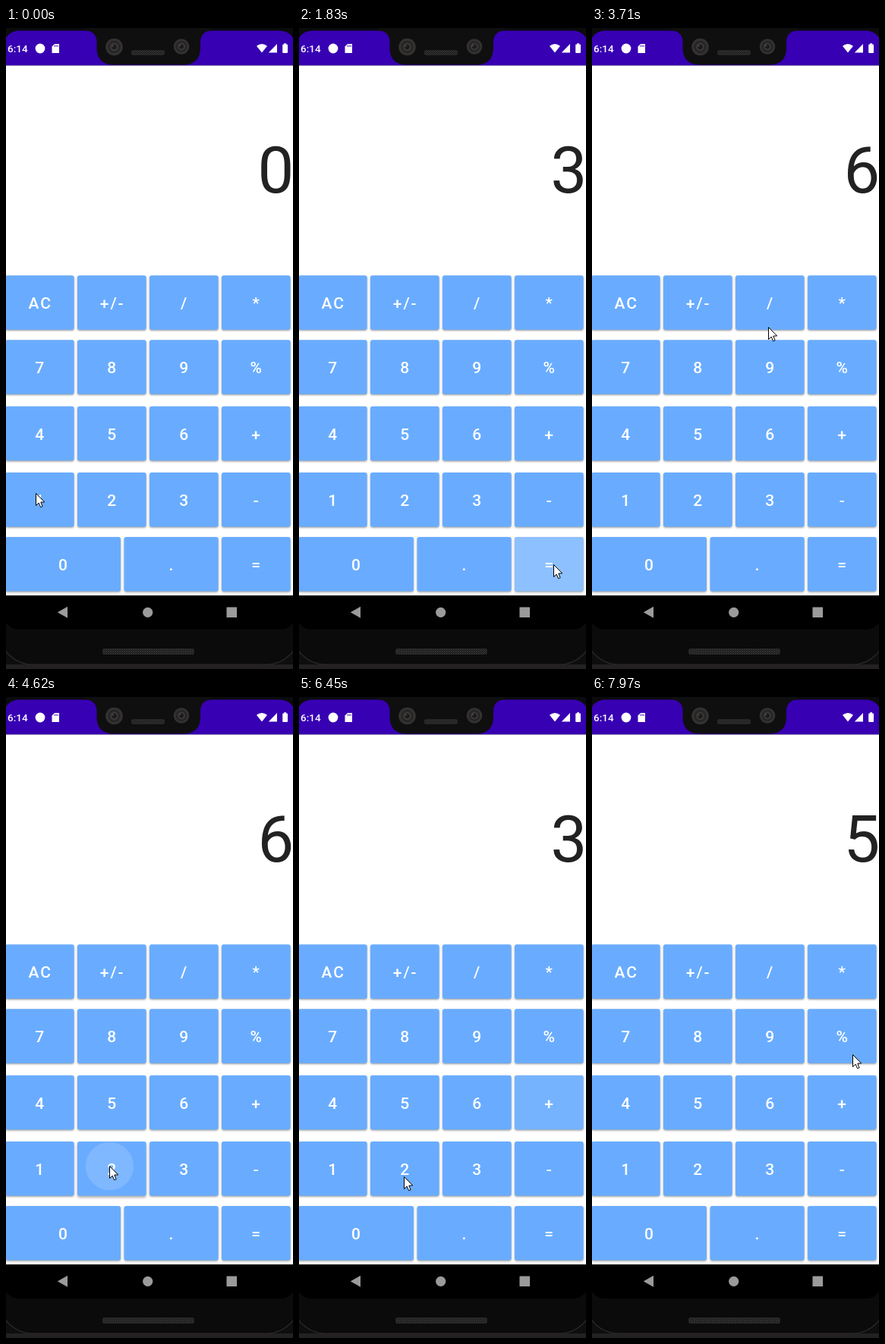
Animation, 378 px wide and 845 px high, one loop 7990 ms. Source, as an HTML page with a canvas:

```html
<!DOCTYPE html>
<html lang="en">
<head>
<meta charset="utf-8">
<title>Calculator</title>
<style>
html, body { margin: 0; width: 100%; height: 100%; overflow: hidden; background: #0e0e0e; }
canvas { display: block; width: 378px; height: 845px; }
</style>
</head>
<body>
<canvas id="stage" width="378" height="845"></canvas>
<script>
const ctx = document.getElementById('stage').getContext('2d');
const LOOP = 7990;
const LAG = 45, ENTER = 225, FADE = 150, LIFT = 100, HOLD = 105;

const clamp = v => Math.max(0, Math.min(1, v));
const mix = (a, b, p) => a + (b - a) * p;
const smooth = p => p * p * (3 - 2 * p);

// cubic-bezier(.4, 0, .2, 1)
function fastOut(x) {
  let lo = 0, hi = 1;
  for (let i = 0; i < 18; i++) {
    const s = (lo + hi) / 2, r = 1 - s;
    if (1.2 * r * r * s + 0.6 * r * s * s + s * s * s < x) lo = s; else hi = s;
  }
  return 3 * (1 - lo) * lo * lo + lo * lo * lo;
}

const buttons = [];
const rows = [['AC', '+/-', '/', '*'], ['7', '8', '9', '%'], ['4', '5', '6', '+'], ['1', '2', '3', '-']];
const tops = [326.3, 411.3, 498.8, 586, 671];
rows.forEach((row, r) => row.forEach((label, c) =>
  buttons.push({ label, x: c * 95 - 1, y: tops[r], w: 90.6, h: 71.5 })));
buttons.push(
  { label: '0', x: -1, y: tops[4], w: 152, h: 71.5 },
  { label: '.', x: 155.6, y: tops[4], w: 124, h: 71.5 },
  { label: '=', x: 284, y: tops[4], w: 90.6, h: 71.5 });

// label, touch time, optional start of the fade
const taps = [
  ['1', 135], ['+', 705], ['2', 1165], ['=', 1590, 1940], ['+', 2330], ['3', 2745, 2975], ['=', 3015],
  ['/', 4025], ['2', 4575], ['=', 4915], ['+', 6125], ['2', 6500], ['=', 6795]
];

const readout = [
  [0, '0'], [240, '1'], [1270, '2'], [1700, '3'], [3120, '6'],
  [4680, '2'], [5020, '3'], [6605, '2'], [6900, '5']
];

// time, x, y of the pointer tip
const path = [
  [270, 39, 613], [680, 334, 541], [745, 334, 545], [1120, 140, 622], [1300, 140, 622],
  [1590, 335, 707], [1940, 335, 707], [2280, 328, 545], [2470, 328, 545], [2730, 238, 645],
  [2840, 238, 645], [3028, 324, 681], [3220, 324, 681], [3400, 342, 681], [3790, 219, 360],
  [4170, 219, 360], [4470, 136, 618], [4690, 136, 618], [4950, 326, 675], [5459, 326, 675],
  [5460, 327, 675], [5600, 327, 675], [6080, 332, 548], [6230, 332, 548], [6450, 138, 632],
  [6640, 138, 632], [6830, 342, 716], [7460, 342, 716], [7970, 343, 471]
];

function pointerAt(t) {
  const i = path.findIndex(k => k[0] > t);
  if (i < 1) return (i ? path[path.length - 1] : path[0]).slice(1);
  const a = path[i - 1], b = path[i];
  const p = smooth((t - a[0]) / (b[0] - a[0]));
  return [mix(a[1], b[1], p), mix(a[2], b[2], p)];
}

function box(x, y, w, h, r, fill) {
  ctx.beginPath();
  ctx.roundRect(x, y, w, h, r);
  if (fill) { ctx.fillStyle = fill; ctx.fill(); }
}

function disc(x, y, r, fill) {
  ctx.beginPath();
  ctx.arc(x, y, r, 0, Math.PI * 2);
  ctx.fillStyle = fill;
  ctx.fill();
}

function poly(points, fill) {
  ctx.beginPath();
  points.forEach(([x, y]) => ctx.lineTo(x, y));
  ctx.closePath();
  ctx.fillStyle = fill;
  ctx.fill();
}

function mesh(x, y, w, h) {
  ctx.save();
  box(x, y, w, h, 3, '#1d1d1d');
  ctx.clip();
  ctx.strokeStyle = '#343434';
  ctx.lineWidth = 0.8;
  ctx.beginPath();
  for (let i = x - h; i < x + w + h; i += 3) {
    ctx.moveTo(i, y); ctx.lineTo(i + h, y + h);
    ctx.moveTo(i + h, y); ctx.lineTo(i, y + h);
  }
  ctx.stroke();
  ctx.restore();
}

function lens(x, y, r) {
  disc(x, y, r, '#343231');
  disc(x, y, r * 0.72, '#262525');
  disc(x, y, r * 0.48, '#3b3938');
  disc(x, y, r * 0.28, '#1c1b1b');
  disc(x - 2, y - 1.5, 1.1, '#55514e');
}

function drawBezel() {
  ctx.fillStyle = '#0e0e0e';
  ctx.fillRect(0, 0, 378, 845);
  ctx.fillStyle = '#242122';
  ctx.fillRect(0, 839, 378, 6);
  box(-9, -20, 396, 859, 44, '#0b0b0b');
  ctx.strokeStyle = '#2c2a2b';
  ctx.lineWidth = 1.2;
  ctx.stroke();
  mesh(127, 818, 121, 8);
}

function drawStatus() {
  ctx.fillStyle = '#0f0f0f';
  ctx.beginPath();
  ctx.moveTo(104, 0);
  ctx.lineTo(104, 3.5);
  ctx.quadraticCurveTo(119, 4, 119.5, 18);
  ctx.lineTo(119.5, 27);
  ctx.quadraticCurveTo(120, 48.5, 142, 48.5);
  ctx.lineTo(233, 48.5);
  ctx.quadraticCurveTo(255.5, 48.5, 256, 27);
  ctx.lineTo(256, 18);
  ctx.quadraticCurveTo(256.5, 4, 271, 3.5);
  ctx.lineTo(271, 0);
  ctx.fill();
  lens(142.5, 25, 11.3);
  lens(231, 24.5, 10.3);
  mesh(165, 29, 44, 7);

  ctx.font = '500 13.5px Roboto, sans-serif';
  ctx.textAlign = 'left';
  ctx.fillStyle = '#fff';
  ctx.fillText('6:14', 2, 32);
  disc(45, 27, 6.4, '#fff');
  poly([[64, 21], [70, 21], [70, 33], [60.5, 33], [60.5, 24.5]], '#fff');
  ctx.fillStyle = '#3700b3';
  [63.7, 65.7, 67.7].forEach(x => ctx.fillRect(x, 22.5, 0.9, 2.4));

  ctx.fillStyle = '#fff';
  ctx.beginPath();
  ctx.moveTo(337, 32.5);
  ctx.lineTo(330, 23.8);
  ctx.quadraticCurveTo(337, 18.2, 344, 23.8);
  ctx.fill();
  poly([[357, 21], [357, 32.5], [345.8, 32.5]], '#fff');
  box(364.2, 21.5, 6.8, 11.5, 1, '#fff');
  ctx.fillRect(366.2, 20.2, 2.8, 2);
}

function drawScreen() {
  ctx.save();
  box(-3, 3.5, 384, 789.5, 20);
  ctx.clip();
  ctx.fillStyle = '#3700b3';
  ctx.fillRect(0, 0, 378, 49.5);
  ctx.fillStyle = '#fff';
  ctx.fillRect(0, 49.5, 378, 698.5);
  ctx.fillStyle = '#000';
  ctx.fillRect(0, 748, 378, 46);
  ctx.restore();
  poly([[67.8, 770.3], [81, 762.8], [81, 777.8]], '#9b9b9b');
  disc(186.7, 770.3, 6.6, '#9b9b9b');
  box(290.5, 763.5, 13.6, 13.6, 0.6, '#9b9b9b');
}

function drawRipple(b, press, fade, t) {
  const age = t - press;
  const alpha = 0.24 * clamp(age / 75) * (1 - clamp((t - fade) / FADE));
  const p = fastOut(clamp(age / ENTER));
  const [sx, sy] = pointerAt(press + LAG);
  const r = mix(Math.max(b.w, b.h) * 0.3, Math.hypot(b.w, b.h) / 2 + 0.5, p);
  ctx.save();
  box(b.x, b.y, b.w, b.h, 2.7);
  ctx.clip();
  disc(mix(sx, b.x + b.w / 2, p), mix(sy, b.y + b.h / 2, p), r, `rgba(255,255,255,${alpha})`);
  ctx.restore();
}

function drawButton(b, t) {
  const live = taps.filter(([label, press, fade = press + ENTER]) =>
    label === b.label && t >= press + LAG && t < fade + FADE);
  let lift = 0;
  for (const [, press] of live) {
    lift = clamp((t - press) / LIFT) - clamp((t - press - HOLD) / LIFT);
  }
  ctx.save();
  ctx.shadowColor = `rgba(0,0,0,${mix(0.38, 0.3, lift)})`;
  ctx.shadowBlur = mix(2.6, 5, lift);
  ctx.shadowOffsetY = mix(1.2, 3.6, lift);
  box(b.x, b.y, b.w, b.h, 2.7, '#69acff');
  ctx.restore();
  for (const [, press, fade = press + ENTER] of live) drawRipple(b, press, fade, t);

  ctx.font = '500 21px Roboto, sans-serif';
  ctx.letterSpacing = '1.87px';
  ctx.textAlign = 'center';
  ctx.fillStyle = '#fff';
  ctx.fillText(b.label, b.x + b.w / 2 + 0.8, b.y + b.h / 2 + 8.2);
  ctx.letterSpacing = '0px';
}

function drawReadout(t) {
  const value = readout.filter(k => k[0] <= t).pop()[1];
  ctx.font = '400 85px Roboto, sans-serif';
  ctx.textAlign = 'left';
  ctx.fillStyle = '#222';
  ctx.fillText(value, 331.5, 217);
}

function drawPointer(t) {
  const [x, y] = pointerAt(t).map(Math.round);
  ctx.save();
  ctx.translate(x + 0.5, y + 0.5);
  poly([[0, 0], [0, 16], [3.7, 12.6], [6.1, 18.2], [8.6, 17.2], [6.3, 11.6], [11.2, 11.4]], '#fff');
  ctx.strokeStyle = '#000';
  ctx.lineWidth = 1;
  ctx.stroke();
  ctx.restore();
}

function draw(t) {
  drawBezel();
  drawScreen();
  drawStatus();
  drawReadout(t);
  buttons.forEach(b => drawButton(b, t));
  drawPointer(t);
}

const start = performance.now();
function tick() {
  draw((performance.now() - start) % LOOP);
  requestAnimationFrame(tick);
}
tick();
</script>
</body>
</html>
```
